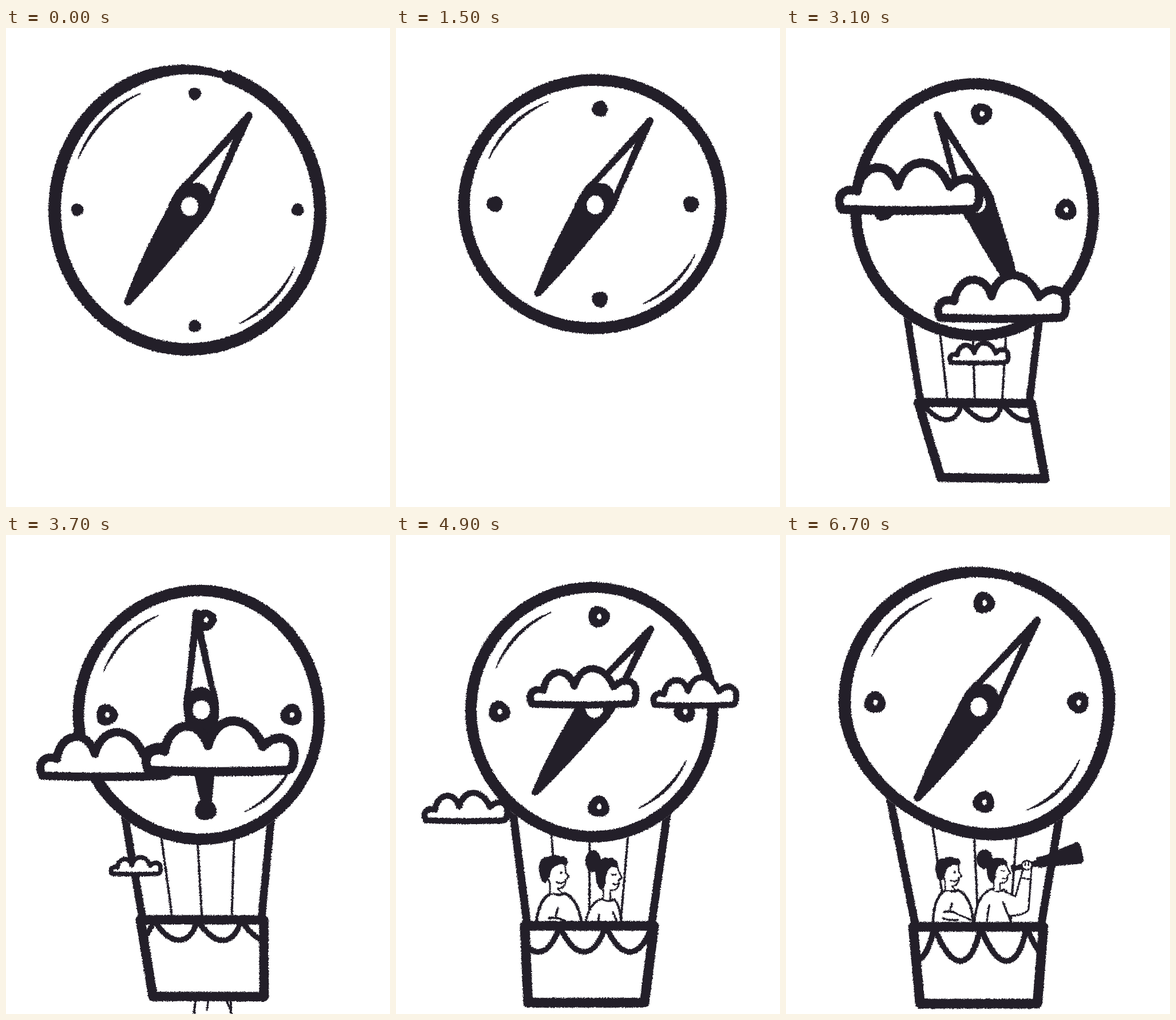
Animation of 671x835 px, one loop 6800 ms. Source, as an HTML page:

```html
<!DOCTYPE html>
<html lang="en">
<head>
<meta charset="utf-8">
<title>Compass balloon</title>
<style>
html, body { margin: 0; width: 100%; height: 100%; overflow: hidden; background: #fff; }
svg { display: block; width: 671px; height: 835px; }
</style>
</head>
<body>
<svg viewBox="0 0 671 835">
  <filter id="rough" filterUnits="userSpaceOnUse" x="0" y="0" width="671" height="835" color-interpolation-filters="sRGB">
    <feTurbulence id="grain" type="fractalNoise" baseFrequency=".4" numOctaves="2" result="n"/>
    <feDisplacementMap in="SourceGraphic" in2="n" scale="4" xChannelSelector="R" yChannelSelector="G"/>
  </filter>
  <g id="art" filter="url(#rough)" stroke-linecap="round" stroke-linejoin="round"></g>
</svg>
<script>
const INK = '#231f29', LOOP = 6800, STEP = 100;
const art = document.getElementById('art'), grain = document.getElementById('grain');

// Seconds at which the main poses are reached.
const BEATS = [0, .7, 1.5, 2.3, 3.1, 4.2, 5.6, 6.7];
// Centre and radii of the ring, one pose per beat.
const RING = [
  [317, 317, 232, 244], [344, 304, 227, 224], [344, 307, 224, 217], [334, 312, 232, 231],
  [330, 317, 208, 219], [343, 311, 213, 214], [342, 305, 211, 219], [333, 292, 232, 227]
];
// Centre, base and width of each cloud, from its first beat on.
const CLOUDS = [
  { first: 3, path: [[455, 567, 93], [337, 583, 102], [143, 596, 75]] },
  { first: 4, path: [[215, 316, 245], [142, 498, 216], [102, 497, 74]] },
  { first: 5, path: [[507, 243, 108], [537, 349, 182], [560, 385, 4]] },
  { first: 4, path: [[377, 505, 224], [371, 338, 286], [282, 251, 85]] }
];

const { sin, cos, exp, max, min, sqrt, hypot, PI } = Math;
const mix = (a, b, u) => a + (b - a) * u;
const ramp = (t, from, to) => {
  const u = min(1, max(0, (t - from) / (to - from)));
  return u * u * (3 - 2 * u);
};
const list = (n, f) => Array.from({ length: n }, (_, i) => f(i));
const pt = p => p.map(n => n.toFixed(1)).join(' ');
const poly = ps => 'M' + ps.map(pt).join('L') + 'Z';
const path = (d, fill = 'none', line = 0) =>
  `<path d="${d}" fill="${fill}" stroke="${line ? INK : 'none'}" stroke-width="${line}"/>`;
const oval = (x, y, rx, ry = rx, fill = INK, line = 0) =>
  `<ellipse cx="${x}" cy="${y}" rx="${rx}" ry="${ry}" fill="${fill}" stroke="${line ? INK : 'none'}" stroke-width="${line}"/>`;
const group = (transform, body) => `<g transform="${transform}">${body}</g>`;

function pose(poses, t, first = 0) {
  return poses.reduce((now, next, i) => {
    const u = i ? ramp(t, BEATS[first + i - 1], BEATS[first + i]) : 1;
    return now.map((v, j) => mix(v, next[j], u));
  }, poses[0]);
}

// The ring squashes, then leaps, while the basket drops out.
function ringAt(t) {
  const u = (t - 1.5) / .8;
  const q = u > 0 && u < 1 ? 1.6 * (1 - u) * sin(2 * PI * u) : 0;
  const [cx, cy, rx, ry] = pose(RING, t);
  return {
    cx, cy: cy + 26 * q, rx: rx + 16 * q, ry: ry - 24 * q,
    line: .094 * min(rx, ry), skew: .13 * ramp(t, 5.2, 6.7)
  };
}

// Point at angle a (radians), k = share of the radius.
function onRing(r, a, k = 1, grow = 0, seed = 0) {
  const wob = k * (1 + .004 * sin(2 * a + seed) + .003 * sin(3 * a + seed * 2));
  const x = (r.rx * wob + grow) * cos(a);
  return [r.cx + x, r.cy + (r.ry * wob + grow) * sin(a) + r.skew * x * max(0, sin(a))];
}

function drawRing(r, t, seed) {
  const start = -.4 * PI, taper = .45 * max(0, cos(2 * PI * t / 2.3)) ** 4;
  const rim = side => list(91, i => {
    const half = r.line / 2 * (1 - taper * max(0, i / 10 - 8));
    return onRing(r, start + i * PI / 45, 1, side * half, seed);
  });
  const outer = rim(1);
  return path(poly(outer), '#fff') + path(poly([...outer, ...rim(-1).reverse()]), INK)
    + oval(...onRing(r, start, 1, 0, seed), r.line / 2 + taper);
}

function drawGleams(r, t) {
  if (t > 2.7 && t < 3.7) return '';
  const k = mix(.9, .865, ramp(t, 0, 4));
  const gleam = (from, to) => {
    const edge = bulge => list(13, i =>
      onRing(r, mix(from, to, i / 12) * PI / 180, k + bulge * sin(PI * i / 12)));
    return path(poly([...edge(.012), ...edge(-.008).reverse()]), INK, 1.8);
  };
  return gleam(204, 247) + gleam(27, 64);
}

function drawDots(r, t, seed) {
  const spread = mix(.83, .765, ramp(t, 0, .7)), size = mix(11, 19, ramp(t, .9, 2.3));
  const hole = 5 * ramp(t, 1.6, 2.3);
  return list(4, i => {
    const a = i * PI / 2;
    const x = r.cx + r.rx * (spread * cos(a) + .055 * sin(a) ** 2), y = r.cy + r.ry * spread * sin(a);
    const blob = list(14, j => {
      const b = j * PI / 7, q = size * (1 + .06 * sin(3 * b + seed + i));
      return [x + q * cos(b), y + q * sin(b)];
    });
    return path(poly(blob), INK) + oval(x + 1, y, hole * .8, hole, '#fff');
  }).join('');
}

function drawNeedle(r, t) {
  const spin = 362 * (1 - exp(-1.13 * max(0, t - 1.5)));
  const sway = 8 * min(1, t) * sin(2 * PI * (t - 1.5) / .8);
  const size = (r.rx + r.ry) / 2, tip = .82 * size, tail = .86 * size, half = .143 * size, m = half * .53;
  const body = `M${tip - 7} -6Q${tip + 3} -5 ${tip} 3Q${tip - 3} 8 ${tip - 9} 7
    L40 ${half - 5}Q10 ${half + 5} -25 ${half - 3}Q${-tail * .6} ${half * .62} ${9 - tail} 7
    Q${-tail - 2} 5 ${-tail} -2Q${2 - tail} -8 ${10 - tail} -7
    Q${-tail * .6} ${-half * .7} -25 ${3 - half}Q10 ${-half - 5} 40 ${5 - half}Z`;
  const slot = `M${tip * .71} 0L${tip * .19} ${-m}Q${tip * .27} 0 ${tip * .19} ${m}Z`;
  const x = r.cx + 4, y = 311 - 1.7 * t;
  return group(`translate(${x} ${y}) rotate(${spin + sway - 57})`, path(body, INK) + path(slot, '#fff'))
    + oval(x, y, 15, 16.5, '#fff');
}

// The basket drops, grows and swings out like a damped pendulum.
function basketAt(r, t) {
  const s = t - 2.3, on = max(0, s), phase = PI * s / 1.6;
  const grow = max(.05, 1 - .44 * exp(-1.5 * s));
  const off = -95 * exp(-2 * on) * cos(phase);
  const lean = exp(-on) * (70 * sin(phase) - 21 * cos(phase)) * min(1, grow * 2);
  const x = mix(r.cx, 336, ramp(t, 3.1, 6)) + off;
  const bottom = 817 - 116 * exp(-1.6 * s), h = max(30, 134 - 68 * exp(-4 * s));
  const w = 114 * grow, tilt = 11 * exp(-3 * on), wb = w * mix(1.1, .9, ramp(s, 0, 1));
  return {
    grow, off, line: 17 * sqrt(grow), depth: 25 + 8 * s,
    corners: [[x - w, bottom - h - tilt], [x + w, bottom - h + tilt],
      [x + lean + wb, bottom + tilt], [x + lean - wb, bottom - tilt]]
  };
}
const along = ([a, b], u) => [mix(a[0], b[0], u), mix(a[1], b[1], u)];

function drawRopes(r, b) {
  return list(5, i => {
    const share = -.67 + .325 * i, edge = i % 4 == 0;
    const c = share * b.grow + .15 * b.off / r.rx;
    const [x, y] = onRing(r, Math.acos(c));
    return path(`M${x} ${y - 5}L${pt(along(b.corners, mix(.02, .98, i / 4)))}`, 'none', edge ? 14 * sqrt(b.grow) : 4);
  }).join('');
}

function drawBasket(b, t) {
  const shape = poly(b.corners), [p, , , q] = b.corners, len = hypot(q[0] - p[0], q[1] - p[1]);
  const step = mix(.5, .355, ramp(t, 2.3, 3.1)), phase = max(0, .136 * (t - 2.9)) % step;
  const node = (u, drop = 0) => {
    const [x, y] = along(b.corners, u), k = drop * b.depth * 1.33 / len;
    return pt([x + k * (q[0] - p[0]), y + k * (q[1] - p[1])]);
  };
  const lace = list(5, i => {
    const u = phase + (i - 1) * step;
    return `M${node(u)}C${node(u + step * .28, 1)} ${node(u + step * .72, 1)} ${node(u + step)}`;
  }).join('');
  return `<clipPath id="tub"><path d="${shape}"/></clipPath>` + path(shape, '#fff')
    + `<g clip-path="url(#tub)">${path(lace, 'none', b.line * .58)}</g>` + path(shape, 'none', b.line);
}

function drawMan(t, settle) {
  const dy = 130 * (1 - ramp(t, 4.5, 5)), k = mix(1.15, 1, settle);
  return group(`translate(${mix(277, 285, settle)} ${672 + dy}) scale(${k}) translate(-285 -672)`,
    path('M257 700V672C258 640 268 622 283 618Q292 624 300 619C315 624 325 645 327 672V700', '#fff', 4.5)
    + path('M276 657Q288 654 300 661L323 671M290 642L287 653M274 668Q286 672 300 671', 'none', 3.5)
    + path('M278 619V603L272 590L280 572H301L302 588L307 594L302 598Q302 611 290 612L296 619', '#fff', 2.6)
    + path('M263 592C257 574 266 562 276 564C281 559 292 561 294 563C303 561 308 570 303 577Q295 572 287 578Q279 580 278 594L271 604Q263 600 263 592Z', INK)
    + path('M288 602Q295 606 300 601', 'none', 2.4) + oval(295, 588, 2));
}

// She pops up long-faced, then relaxes to normal size.
function drawWoman(t) {
  const hidden = 1 - ramp(t, 3.7, 4.2), late = 1 - ramp(t, 4.2, 5.4);
  const sx = 1 + .3 * late, sy = 1 + .75 * late, x = 369, y = 584 + 16 * late + 130 * hidden;
  const body = path('M328 700C328 650 338 624 360 617Q370 624 381 618Q390 626 393 650V700', '#fff', 4)
    + path('M355 645L351 673M379 640L391 670', 'none', 3.5);
  const head = path('M362 622V604L360 582L368 570H383L385 580L391 592L386 595Q388 604 381 608L373 609V622', '#fff', 2.4)
    + path('M350 590C347 571 360 563 371 565C382 564 387 573 385 580Q375 573 369 583Q364 590 366 600L359 609Q350 602 350 590Z', INK)
    + path('M377 600Q382 603 386 599M375 587Q379 589 382 587', 'none', 2);
  return group(`translate(0 ${45 * late + 110 * hidden})`, body)
    + group(`translate(${x} ${y}) scale(${sx} ${sy}) translate(-368 -586)`, head)
    + oval(x - 22 * sx, y - 19 * sqrt(sy), 14, 17 * sqrt(sy));
}

function drawScope(t, settle) {
  const lift = ramp(t, 4.7, 5.5), low = 110 * (1 - lift);
  const x = mix(400, 394, settle), y = mix(627, 582, settle) + low;
  const angle = -13, a = angle * PI / 180, len = mix(111, 126, settle) * mix(.2, 1, lift);
  const hx = x + len * .22 * cos(a), hy = y + len * .22 * sin(a), ey = mix(670, 630, settle) + low;
  const tube = `M0 -5L5 -6V-4L${len * .37} -5V-9L${len * .6} -10V-12L${len * .96} -19
    Q${len + 2} -18 ${len} 0Q${len + 2} 17 ${len * .96} 18L${len * .6} 12V10L${len * .37} 9V6L5 4V6L0 5Z`;
  return path(`M383 ${622 + low}L401 ${ey}L${hx - 5} ${hy}L${hx + 8} ${hy + 4}L${hx + 3} ${652 + low}Q${hx} ${662 + low} 392 ${664 + low}`, '#fff', 3.2)
    + path(`M${hx - 8} ${hy + 22}L${hx + 6} ${hy + 25}`, 'none', 2.5)
    + group(`translate(${x} ${y}) rotate(${angle})`, path(tube, INK, 1))
    + oval(hx, hy, 9, 8, '#fff', 2.5)
    + path(`M${hx - 3} ${hy - 7}V${hy}M${hx + 3} ${hy - 7}V${hy}`, 'none', 2);
}

function drawCloud({ first, path: way }, t) {
  const born = BEATS[first], gone = BEATS[first + way.length - 1];
  const size = ramp(t, born - .5, born) * (1 - ramp(t, gone, gone + .4));
  const [cx, y, full] = pose(way, t, first), w = full * size, h = .32 * w;
  if (w < 8) return '';
  const p = (u, v) => pt([cx + (u - .5) * w, y - v * h]);
  const d = `M${p(.02, 0)}C${p(-.03, .3)} ${p(.04, .5)} ${p(.13, .4)}C${p(.15, 1)} ${p(.36, 1.15)} ${p(.42, .52)}
    C${p(.48, 1.22)} ${p(.7, 1.2)} ${p(.79, .5)}C${p(.88, .8)} ${p(1.01, .72)} ${p(1, .3)}Q${p(1, .02)} ${p(.95, 0)}
    Q${p(.5, -.06)} ${p(.02, 0)}Z`;
  return path(d, '#fff', 4 + w * .046);
}

function draw(step) {
  const t = step * STEP / 1000, r = ringAt(t), settle = ramp(t, 5.6, 6.7);
  grain.setAttribute('seed', step + 1);
  let s = '';
  if (t >= 1.8) {
    const b = basketAt(r, t);
    s += drawRopes(r, b);
    if (t >= 4.5) s += drawMan(t, settle);
    if (t >= 3.7) s += drawWoman(t);
    if (t >= 4.7) s += drawScope(t, settle);
    s += drawBasket(b, t);
  }
  s += drawRing(r, t, step) + drawGleams(r, t) + drawDots(r, t, step) + drawNeedle(r, t);
  if (t > 2.05 && t < 2.55) s += group(`translate(${(2.3 - t) * 80} 0)`,
    path('M303 753Q330 775 362 780Q328 764 303 753ZM338 754Q390 773 441 755Q390 761 338 754Z', INK, 3));
  if (t > 3.95 && t < 4.45) s += path('M401 575V582M406 572L408 576M409 580L412 579M406 584L407 587', 'none', 2);
  art.innerHTML = s + CLOUDS.map(c => drawCloud(c, t)).join('');
}

const begin = performance.now();
let shown = -1;
function tick() {
  const step = Math.floor((performance.now() - begin) % LOOP / STEP);
  if (step != shown) draw(shown = step);
  requestAnimationFrame(tick);
}
tick();
</script>
</body>
</html>
```
